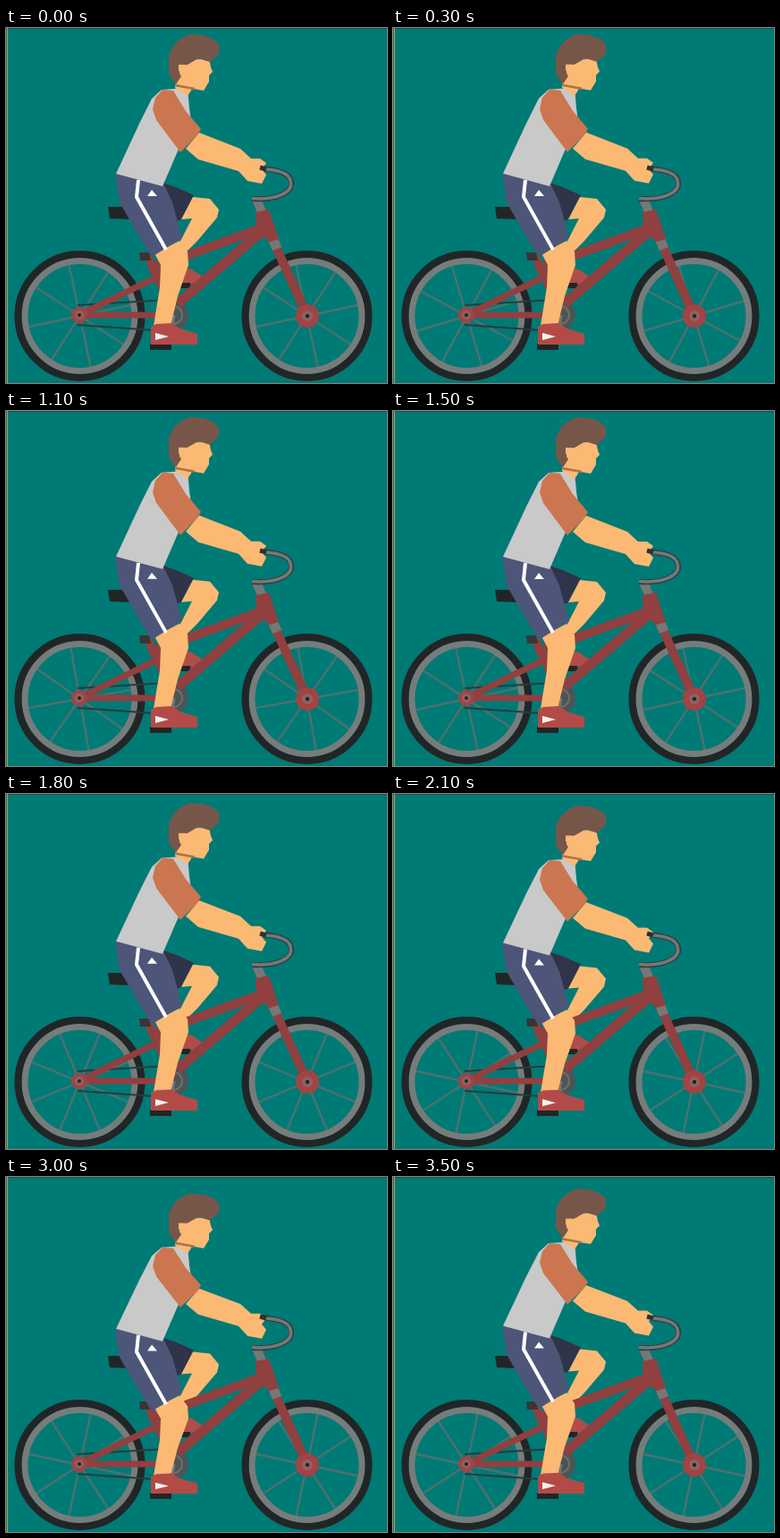
Animation, 426 px wide and 397 px high, one loop 3.6 s. Source, as an HTML page with a canvas:

```html
<!DOCTYPE html>
<html lang="en">
<head>
<meta charset="utf-8">
<title>Cyclist</title>
<style>
html, body { margin: 0; width: 100%; height: 100%; overflow: hidden; background: #007a75; }
canvas { display: block; }
</style>
</head>
<body>
<canvas id="c" width="426" height="397"></canvas>
<script>
const ctx = document.getElementById('c').getContext('2d');
const LOOP = 3600, TAU = Math.PI * 2;
const SKIN = '#fbb974', RED = '#923f40', TYRE = '#222526', RIM = '#777c7b';

// [time, value] keys
const SINK = [[0, 0], [700, -0.5], [1500, 0], [2100, 6], [2600, 11], [3000, 11.4], [3500, 6], [3600, 0]];
const SPIN = [[0, 33], [700, 127], [1500, 213], [2100, 282], [2600, 327], [3000, 372], [3500, 417], [3600, 438]];
// how much of the sink reaches each height
const GIVE = [[8, 1], [70, 0.85], [139, 0.6], [250, 0.55], [331, 0.1], [354, 0]];

let sink = 0;

function lerpKeys(keys, x) {
  if (x <= keys[0][0]) return keys[0][1];
  for (let i = 1; i < keys.length; i++) {
    const [x0, v0] = keys[i - 1], [x1, v1] = keys[i];
    if (x <= x1) return v0 + (v1 - v0) * (x - x0) / (x1 - x0);
  }
  return keys[keys.length - 1][1];
}

function trace(p, soft) {
  ctx.beginPath();
  for (let i = 0; i < p.length; i += 2) {
    ctx.lineTo(p[i], p[i + 1] + (soft ? sink * lerpKeys(GIVE, p[i + 1]) : 0));
  }
}
function shape(color, ...p) {
  trace(p, false);
  ctx.fillStyle = color;
  ctx.fill();
}
function body(color, ...p) {
  trace(p, true);
  ctx.fillStyle = color;
  ctx.fill();
}
function line(color, width, ...p) {
  trace(p, false);
  ctx.strokeStyle = color;
  ctx.lineWidth = width;
  ctx.stroke();
}
function bodyLine(color, width, ...p) {
  trace(p, true);
  ctx.strokeStyle = color;
  ctx.lineWidth = width;
  ctx.stroke();
}
function disc(color, x, y, r) {
  ctx.beginPath();
  ctx.arc(x, y, r, 0, TAU);
  ctx.fillStyle = color;
  ctx.fill();
}
function ring(color, x, y, r, width) {
  ctx.beginPath();
  ctx.arc(x, y, r, 0, TAU);
  ctx.strokeStyle = color;
  ctx.lineWidth = width;
  ctx.stroke();
}

function wheel(x, y, deg) {
  for (let i = 0; i < 8; i++) {
    const a = (deg + i * 45) * TAU / 360;
    line('#4c716e', 2.4, x, y, x + 60 * Math.cos(a), y + 60 * Math.sin(a));
  }
  ring(RIM, x, y, 61.5, 7);
  ring(TYRE, x, y, 69, 8);
}

function farLeg() {
  body('#2f3449', 172, 172, 190, 178, 210, 187, 196, 214, 186, 218);
  body(SKIN, 209, 189, 228, 191, 238, 203, 236, 212, 214, 238, 200, 252, 189, 250, 208, 213, 196, 214);
  shape('#b04d49', 197, 268, 208, 270, 221, 279, 219, 286, 196, 286);
  shape(TYRE, 192, 285, 206, 285, 206, 291, 192, 291);
}

function frame() {
  shape(TYRE, 114, 200, 136, 200, 140, 214, 116, 213);
  line('#263c3c', 2, 80, 310, 180, 304);
  line('#263c3c', 2, 80, 332, 180, 339);
  disc('#4d5454', 187, 321, 17);
  ring('#6b6f6f', 187, 321, 10, 2);
  line(RED, 7, 82, 321, 172, 277, 190, 266);
  line(RED, 7, 82, 321, 187, 321);
  line(RED, 9, 159, 256, 187, 316);
  line(RED, 10, 160, 270, 288, 223);
  line(RED, 11, 192, 308, 290, 224);
  shape('#3c3335', 149, 251, 160, 251, 162, 260, 150, 260);

  line(RED, 10, 296, 232, 337, 322);
  line('#777777', 11, 299, 237, 303, 247);
  line('#777777', 10, 280, 191, 287, 208);
  shape(RED, 279, 206, 294, 203, 305, 236, 295, 239, 280, 228);
  disc('#a24344', 82, 321, 9);
  disc('#8f6261', 82, 321, 5);
  disc(TYRE, 82, 321, 2);
  disc('#a24344', 337, 322, 13);
  disc('#8f6261', 337, 322, 6);
  disc(TYRE, 337, 322, 2.2);
}

function bars() {
  for (const [color, width, off] of [['#303d3e', 6, 0], ['#737978', 3.5, -0.6]]) {
    ctx.beginPath();
    ctx.moveTo(275, 191 + off);
    ctx.bezierCurveTo(302, 193, 321, 184, 319 + off, 172);
    ctx.bezierCurveTo(317, 161, 302, 159, 287, 157 - off);
    ctx.strokeStyle = color;
    ctx.lineWidth = width;
    ctx.stroke();
  }
}

function nearLeg() {
  line('#777777', 5, 187, 321, 181, 352);
  shape(TYRE, 161, 353, 185, 353, 185, 360, 161, 360);
  body(SKIN, 166, 252, 194, 238, 203, 250, 204, 265, 192, 300, 184, 333, 165, 333, 172, 290, 173, 265);
  body('#b24b48', 162, 334, 168, 331, 186, 330, 194, 336, 214, 342, 214, 354, 162, 354);
  body('#f4f0ec', 167, 341, 182, 345, 167, 349);
  body('#4d5678', 122, 163, 175, 172, 186, 195, 197, 235, 163, 256, 150, 235, 127, 195);
  bodyLine('#ffffff', 4, 148, 170, 146, 189, 179, 248);
  body('#ffffff', 158, 188, 163, 181, 169, 188);
}

function torso() {
  body('#c9c9c9', 174, 69, 203, 67, 205, 90, 207, 104, 191, 140, 175, 177, 123, 163, 149, 107, 163, 79);
  body(SKIN, 190, 50, 210, 60, 207, 70, 203, 76, 189, 67);
  body(SKIN, 216, 117, 262, 135, 274, 146, 284, 146, 291, 151, 286, 158, 291, 164, 286, 174, 270, 171, 260, 160, 215, 147, 201, 135);
  body('#cb7650', 175, 69, 187, 70, 201, 93, 218, 113, 213, 121, 195, 139, 168, 103, 164, 91, 167, 78);
  line('#2b3333', 5, 284, 156, 291, 158);
}

function head() {
  body(SKIN, 192, 40, 204, 36, 227, 34, 229, 44, 231, 49, 227, 53, 227, 60, 221, 70, 210, 68, 190, 62);
  bodyLine('#a8734d', 2.5, 189, 64, 211, 68);
  body('#77564a', 182, 30, 187, 20, 195, 12, 205, 7, 220, 8, 231, 12, 238, 18, 238, 29, 228, 38, 215, 34, 203, 41, 195, 42, 194, 51, 196, 54, 190, 63, 182, 52);
  body(SKIN, 193, 41, 200, 41, 200, 51, 196, 53, 193, 47);
}

function draw(t) {
  sink = lerpKeys(SINK, t);
  const spin = lerpKeys(SPIN, t);
  ctx.fillStyle = '#007a75';
  ctx.fillRect(0, 0, 426, 397);
  wheel(82.5, 322, spin);
  wheel(336.5, 322, spin);
  farLeg();
  frame();
  bars();
  nearLeg();
  torso();
  head();
  ctx.fillStyle = '#1d4f4c';
  ctx.fillRect(0, 0, 426, 1);
  ctx.fillStyle = '#c99a35';
  ctx.fillRect(1, 0, 1, 397);
}

function tick(now) {
  draw(Math.floor((now % LOOP) / 100) * 100);
  requestAnimationFrame(tick);
}
draw(0);
requestAnimationFrame(tick);
</script>
</body>
</html>
```
